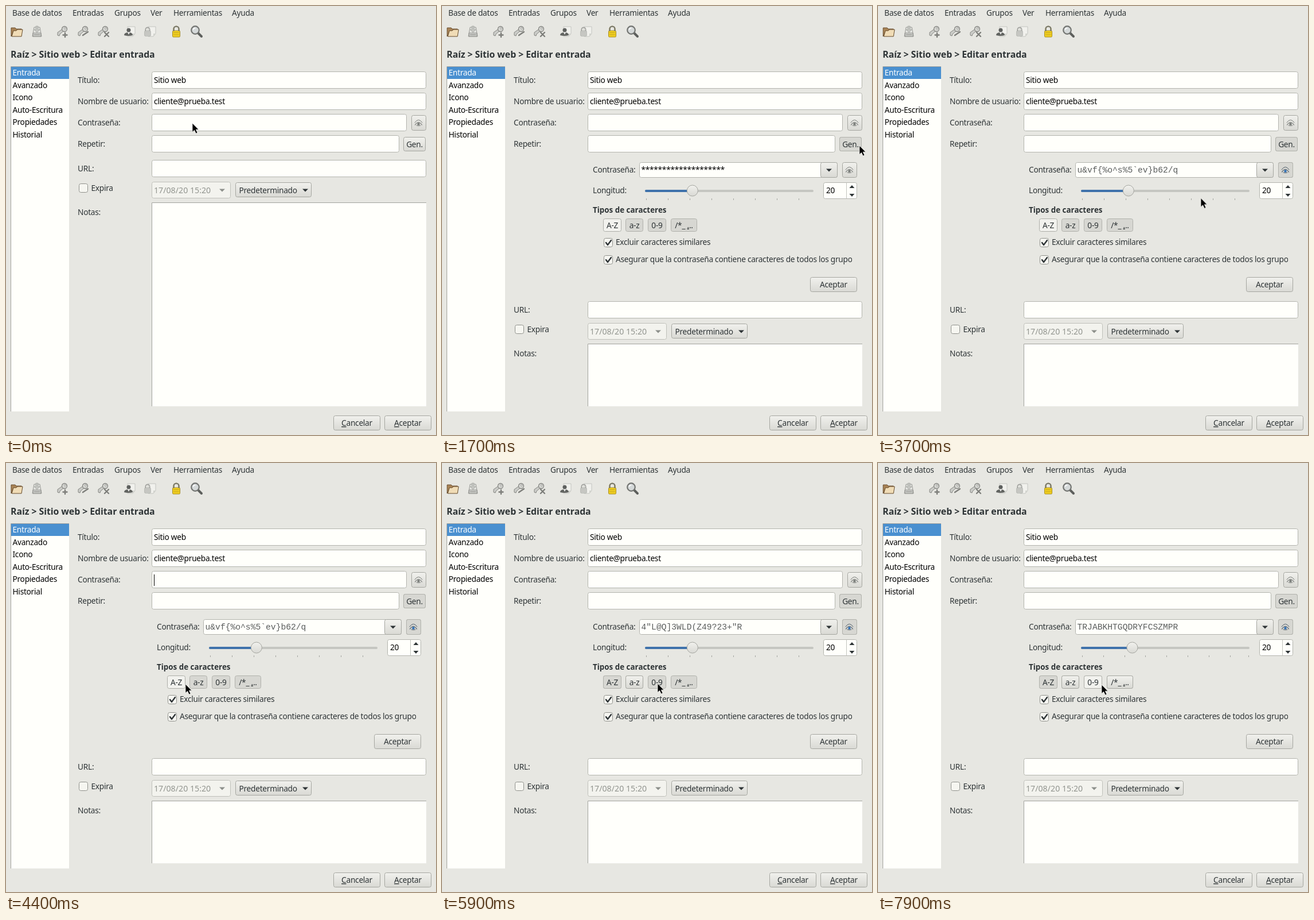
An HTML page for the animation above (8000 ms loop, 750x747 px).

```html
<!DOCTYPE html>
<html lang="es">
<head>
<meta charset="utf-8">
<title>Editar entrada</title>
<style>
html, body { margin: 0; width: 100%; height: 100%; overflow: hidden; background: #e7e7e2; }
svg { display: block; }
text { font: 13.7px "Noto Sans", "Open Sans", sans-serif; letter-spacing: -.27px; fill: #2e3436; white-space: pre; }
.ink { fill: #000; }
.dim { fill: #92958f; font-size: 14.2px; letter-spacing: 0; }
.bold { font-weight: 700; font-size: 13.4px; letter-spacing: 0; }
.title { font-weight: 700; font-size: 15.9px; letter-spacing: -.08px; }
.mono { font: 14.67px "Liberation Mono", monospace; letter-spacing: 0; fill: #5a5d5d; }
.mid { text-anchor: middle; }
.field { fill: #fffffb; stroke: #b3b4ae; }
.off { fill: #f3f3ee; stroke: #bfc0ba; }
.tick { fill: #f6f6f1; stroke: #8f908b; }
.up { fill: url(#raised); stroke: #a5a6a0; }
.hot { fill: #f2f2ee; stroke: #adaea8; }
.down { fill: #d7d7d2; stroke: #b0b1ab; }
.line { fill: none; stroke-linecap: round; stroke-linejoin: round; }
.caret { animation: blink 8s step-end infinite; }
.lower { animation: drop 8s step-end infinite; }
.pointer { animation: move 8s step-end infinite; }

@keyframes blink {
  0%, 12.5%, 20%, 36.25%, 45%, 57.5%, 70%, 73.75%, 87.5%, 98.75%, 100% { visibility: hidden; }
  6.25%, 16.25%, 27.5%, 38.75%, 52.5%, 63.75%, 71.25%, 80%, 96.25% { visibility: visible; }
}
@keyframes drop {
  0% { transform: none; }
  21.25%, 100% { transform: translateY(246px); }
}
@keyframes move {
  0% { transform: translate(325px, 204px); }
  6.25% { transform: translate(325px, 204px); animation-timing-function: steps(4, start); }
  11.25% { transform: translate(510px, 216px); animation-timing-function: steps(5, start); }
  17.5% { transform: translate(728px, 243px); }
  27.5% { transform: translate(728px, 243px); animation-timing-function: steps(3, start); }
  31.25% { transform: translate(717px, 281px); }
  36.25% { transform: translate(715px, 288px); }
  45% { transform: translate(715px, 288px); animation-timing-function: steps(5, start); }
  51.25% { transform: translate(335px, 404px); animation-timing-function: steps(4, start); }
  56.25% { transform: translate(313px, 385px); }
  66.25% { transform: translate(332px, 385px); }
  73.75% { transform: translate(376px, 384px); }
  75% { transform: translate(386px, 385px); }
  76.25% { transform: translate(395px, 385px); }
  80% { transform: translate(380px, 386px); }
  85% { transform: translate(380px, 386px); animation-timing-function: steps(4, start); }
  90% { transform: translate(428px, 385px); }
  96.25% { transform: translate(428px, 385px); animation-timing-function: steps(3, start); }
  100% { transform: translate(390px, 386px); }
}
</style>
</head>
<body>
<svg id="stage" width="750" height="747" viewBox="0 0 750 747"></svg>
<script>
const LOOP = 8000;
const rules = new Set();

const esc = s => s.replace(/&/g, '&amp;').replace(/</g, '&lt;');
// An underscore pair marks a mnemonic letter: "__A" underlines the A
const mnemonic = s => s.replace(/__(.)/, '<tspan text-decoration="underline">$1</tspan>');
const text = (x, y, s, cls = '') => `<text x="${x}" y="${y}" class="${cls}">${esc(s)}</text>`;
const box = (x, y, w, h, cls = 'field', r = 3) =>
  `<rect x="${x + .5}" y="${y + .5}" width="${w - 1}" height="${h - 1}" rx="${r}" class="${cls}"/>`;
const path = (d, fill, more = '') => `<path d="${d}" fill="${fill}" ${more}/>`;
const line = (d, color, width = 1.5) =>
  `<path d="${d}" class="line" stroke="${color}" stroke-width="${width}"/>`;
const button = (x, y, w, h, label, state = 'up') => box(x, y, w, h, state) +
  `<text x="${x + w / 2}" y="${y + h / 2 + 5}" class="mid">${mnemonic(label)}</text>`;
const arrow = (x, y, w, h, color = '#2e3436') => path(`M${x - w} ${y}h${2 * w}l${-w} ${h}z`, color);
const place = (x, y, s) => `<g transform="translate(${x} ${y})">${s}</g>`;

// Content that shows up at a given time and stays until the loop ends
function from(ms, svg) {
  rules.add(`@keyframes at${ms} { 0% { visibility: hidden } ${ms / LOOP * 100}%, 100% { visibility: visible } }`);
  return `<g style="animation: at${ms} ${LOOP}ms step-end infinite">${svg}</g>`;
}

function eye(x, y, state, color, pupil = color) {
  return box(x - 12.5, y - 13, 26, 27, state) + place(x, y,
    line('M-6.5 0Q0 -9.5 6.5 0', color, 1) + line('M-6 4Q0 -5 6 4', color, 1.2) +
    line('M-3.5 5Q0 6.5 3.5 5', color, 1) + `<circle cy="2.5" r="2.2" fill="${pupil}"/>`);
}

function check(y, label) {
  return box(282, y, 16, 16, 'tick') + line(`M286 ${y + 8}l3 4l6 -8`, '#2e3436', 2.4) + text(303, y + 12, label);
}

function slider(min, value = 20, max = 64) {
  const at = v => 356 + 290 * (Math.min(v, max) - min) / (max - min);
  let ticks = '';
  for (let v = min; v <= max + 1; v += 8) ticks += `M${Math.round(at(v)) + .5} 335v3`;
  const x = at(value);
  return `<rect x="354" y="320" width="294" height="4" rx="2" fill="#c5c6c1"/>
    <rect x="354" y="320" width="${x - 354}" height="4" rx="2" fill="#3f72ab"/>
    <path d="${ticks}" stroke="#a3a49f"/>
    <circle cx="${x}" cy="321.5" r="9.5" class="up"/>`;
}

const generated = (min, word, cls = 'mono') => `
  <rect x="346" y="275" width="313" height="22" fill="#fffffb"/>
  <rect x="346" y="309" width="310" height="30" fill="#e7e7e2"/>
  ${text(347.5, 290, word, cls)}${slider(min)}`;

const key = mark => path('M1 12L11 5L13 8L5 15L4 18L1 17z', '#cbccc8', 'stroke="#868783"') +
  `<circle cx="13" cy="6" r="4.5" fill="#d6d7d3" stroke="#868783" stroke-width="1.3"/>
   <circle cx="14" cy="5" r="1.5" fill="#f2f2ee" stroke="#868783" stroke-width=".7"/>` + line(mark, '#7d7e7a', 2.4);
const sheet = path('M7 2h13v12l-4 5H7z', '#f1f1ed', 'stroke="#c3c4bf"') + path('M20 14h-4v5z', '#d3d4cf');
const lock = (body, edge) => line('M3 9V5a4.5 4.5 0 0 1 9 0V9', edge, 2.2) +
  `<rect x="1" y="8" width="13" height="11" rx="1.5" fill="${body}" stroke="${edge}"/>` +
  line('M3 11.5H12M3 15H12', edge, .7);

const toolbar =
  place(8, 35, path('M1 18V3h7l2 2h9v4H5z', '#a98457', 'stroke="#664b2b"') +
    path('M5 8h5l2-2h9l-2 12H2z', '#f0dcb6', 'stroke="#664b2b"')) +
  place(45, 35, path('M4 2h10l3 16H1z', '#e2e3df', 'stroke="#979894"') +
    path('M2 12h14v6H2z', '#d0d1cd', 'stroke="#8c8d89"') +
    path('M7 0h4v6h3l-5 5l-5-5h3z', '#c4c5c1', 'stroke="#a0a19d" stroke-width=".7"') +
    line('M4 15h10', '#80817d', 1)) +
  place(89, 34, key('M14 13v7M10.5 16.5h7')) +
  place(125, 34, key('M9 17l9-6')) +
  place(160, 34, key('M12 12l7 7M19 12l-7 7')) +
  place(205, 34, sheet + `<circle cx="9" cy="8" r="3.5" fill="#5e605e"/>` +
    path('M1 17q0-5 8-5q7 0 7 5q-7 2-15 0z', '#626461') + path('M7 12h4l-2 4z', '#eee')) +
  place(241, 34, sheet + place(0, 3, `<g transform="scale(.8)">${lock('#cfd0cb', '#a0a19d')}</g>`)) +
  place(289.5, 35, lock('#f3d01f', '#a58b20') + line('M3 8V5a4.5 4.5 0 0 1 9 0V8', '#777975', 2)) +
  place(321, 34, line('M14 13l6 6', '#5d5f5c', 4) +
    `<circle cx="9" cy="8" r="6.8" fill="#d5d9d9" stroke="#737572" stroke-width="2.2"/>` +
    line('M5.5 7Q6 4.5 9 4.5', '#fff', 1.3));

const menu = [[11, 'Base de datos'], [116, 'Entradas'], [189, 'Grupos'], [252, 'Ver'],
  [292, 'Herramientas'], [394, 'Ayuda']].map(([x, s]) => text(x, 17, s)).join('');

const sidebar = `<rect x="8" y="105" width="102" height="601" fill="#fffffb"/>
  <path d="M8.5 706V105.5H110" fill="none" stroke="#a2a39e"/>
  <rect x="9" y="106" width="101" height="21" fill="#4a90d0"/>
  <text x="11.5" y="121" style="fill:#fff">Entrada</text>` +
  ['Avanzado', 'Icono', 'Auto-Escritura', 'Propiedades', 'Historial']
    .map((s, i) => text(11.5, Math.round(142.7 + 21.5 * i), s, 'ink')).join('');

const form = text(125, 134, 'Título:') + box(254, 114, 479, 30) + text(258, 134, 'Sitio web', 'ink') +
  text(125, 171, 'Nombre de usuario:') + box(254, 151, 479, 30) + text(258, 171, 'cliente@prueba.test', 'ink') +
  text(125, 208, 'Contraseña:') + box(254, 188, 445, 30) + eye(719.5, 203, 'up', '#777a77') +
  text(125, 245, 'Repetir:') + box(254, 225, 432, 30) + button(693, 228, 39, 25, 'Gen.') +
  from(1600, button(693, 228, 39, 25, 'Gen.', 'down')) +
  '<path class="caret" d="M258.5 194v20" stroke="#000"/>';

const lower = `<g clip-path="url(#above)"><g class="lower">
  ${text(125, 288, 'URL:')}${box(254, 268, 479, 30)}
  ${box(127, 309, 16, 16, 'tick')}${text(148.5, 321.5, 'Expira')}
  ${box(254, 306, 138, 29, 'off')}${text(258, 325.5, '17/08/20 15:20', 'dim')}${arrow(377, 318.5, 5, 5, '#8d908b')}
  ${box(400, 307, 133, 26, 'up')}${text(406.5, 325.5, 'Predeterminado')}${arrow(522, 318.5, 5, 5)}
  ${text(125, 363.5, 'Notas:')}
  <rect x="254" y="342" width="479" height="355" fill="#fffffb"/>
  <path d="M254.5 720V342.5H733" fill="none" stroke="#a2a39e"/></g></g>`;

// Each character group flips from its first state to the second
const groups = [[281, 32, 'A-Z', 'hot', 'down', 4500], [320, 31, 'a-z', 'down', 'up', 5500],
  [359, 32, '0-9', 'down', 'hot', 6600], [399, 46, '/*_ __...', 'down', 'up', 7300]]
  .map(([x, w, s, before, after, ms]) => button(x, 370, w, 23, s, before) +
    from(ms, button(x, 370, w, 23, s, after))).join('');

const panel = from(1700,
  text(263, 290, 'Contraseña:') + box(344, 272, 346, 27) +
  box(660, 272, 30, 27, 'up') + arrow(675, 283.5, 5, 5) +
  eye(710.5, 285, 'up', '#777a77') +
  from(2900, eye(710.5, 285, 'down', '#a0a29e')) +
  from(3100, eye(710.5, 285, 'down', '#4d5a66', '#2f6fb4')) +
  text(263, 326, 'Longitud:') + box(665, 307, 59, 29) + line('M705.5 308v27', '#c3c4bf', 1) +
  text(670, 326, '20', 'ink') + arrow(715, 317, 4.5, -5) + arrow(715, 327, 4.5, 5) +
  generated(3, '*'.repeat(20), 'ink') +
  from(3100, generated(3, 'u&vf{%o^s%5`ev}b62/q')) +
  from(4600, generated(4, 'K7{mR"x4?Tq&Wd]9hZ+e')) +
  from(5600, generated(3, '4"L@Q]3WLD(Z49?23+"R')) +
  from(6700, generated(2, 'H&Q{TW"]XK@D?RM(+ZLP')) +
  from(7500, generated(1, 'TRJABKHTGQDRYFCSZMPR')) +
  text(263, 360, 'Tipos de caracteres', 'bold') + groups +
  check(404, 'Excluir caracteres similares') +
  `<g clip-path="url(#inside)">${check(434, 'Asegurar que la contraseña contiene caracteres de todos los grupos')}</g>` +
  button(642, 472, 82, 26, 'Aceptar'));

const pointer = '<path class="pointer" d="M0 0V15.5L3.6 12.3L6.3 18L9 16.8L6.4 11.2H11z" ' +
  'fill="#000" stroke="#f4f4f0" stroke-width=".8"/>';

document.getElementById('stage').innerHTML = `
  <defs>
    <linearGradient id="raised" x2="0" y2="1">
      <stop stop-color="#f1f1ed"/><stop offset="1" stop-color="#d9d9d4"/>
    </linearGradient>
    <clipPath id="above"><rect y="260" width="750" height="437"/></clipPath>
    <clipPath id="inside"><rect x="263" y="400" width="452" height="60"/></clipPath>
  </defs>
  <rect width="750" height="747" fill="#e7e7e2"/>` +
  menu + toolbar + text(8, 90, 'Raíz > Sitio web > Editar entrada', 'title') +
  sidebar + form + lower + panel +
  button(571, 713, 82, 26, '__Cancelar') + button(660, 713, 82, 26, '__Aceptar') + pointer;

document.querySelector('style').append([...rules].join('\n'));
</script>
</body>
</html>
```
